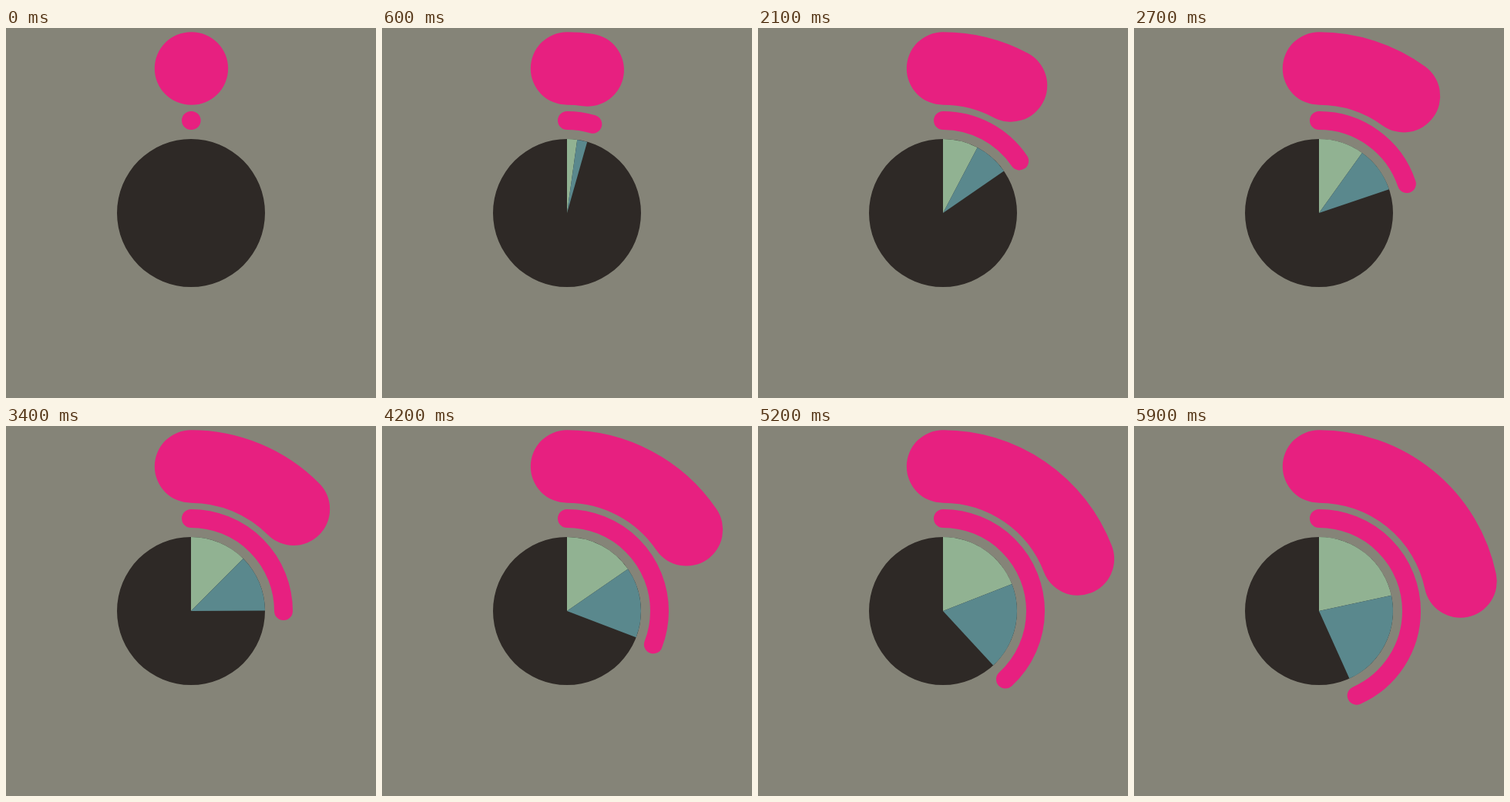
An HTML page with a canvas that plays this animation: 480 by 480 pixels, repeating every 6 s.

```html
<!DOCTYPE html>
<html lang="en">
<head>
<meta charset="utf-8">
<title>Growing arcs</title>
<style>
  html, body { margin: 0; width: 100%; height: 100%; overflow: hidden; background: #858478; }
  canvas { display: block; }
</style>
</head>
<body>
<canvas id="stage" width="480" height="480"></canvas>
<script>
const ctx = document.getElementById('stage').getContext('2d');
const LOOP = 6000, STEP = 100;
const CENTER = 240, TOP = -Math.PI / 2;
const MAX_SWEEP = 0.44 * 2 * Math.PI;
const MIN_ARC = 0.005; // keeps the round caps visible at zero sweep

function wedge(from, to, color) {
  ctx.fillStyle = color;
  ctx.beginPath();
  ctx.moveTo(CENTER, CENTER);
  ctx.arc(CENTER, CENTER, 96, TOP + from, TOP + to);
  ctx.fill();
}

function band(radius, width, sweep) {
  ctx.strokeStyle = '#e72080';
  ctx.lineCap = 'round';
  ctx.lineWidth = width;
  ctx.beginPath();
  ctx.arc(CENTER, CENTER, radius, TOP, TOP + sweep + MIN_ARC);
  ctx.stroke();
}

function draw(time) {
  const t = Math.floor((time % LOOP) / STEP) * STEP;
  const sweep = MAX_SWEEP * t / LOOP;

  ctx.fillStyle = '#858478';
  ctx.fillRect(0, 0, 480, 480);
  wedge(0, 2 * Math.PI, '#2e2926');
  wedge(0, sweep / 2, '#91b292');
  wedge(sweep / 2, sweep, '#5a888d');
  band(120, 24, sweep);
  band(187.5, 94.4, sweep / 2);
}

function tick() {
  draw(performance.now());
  requestAnimationFrame(tick);
}
tick();
</script>
</body>
</html>
```
